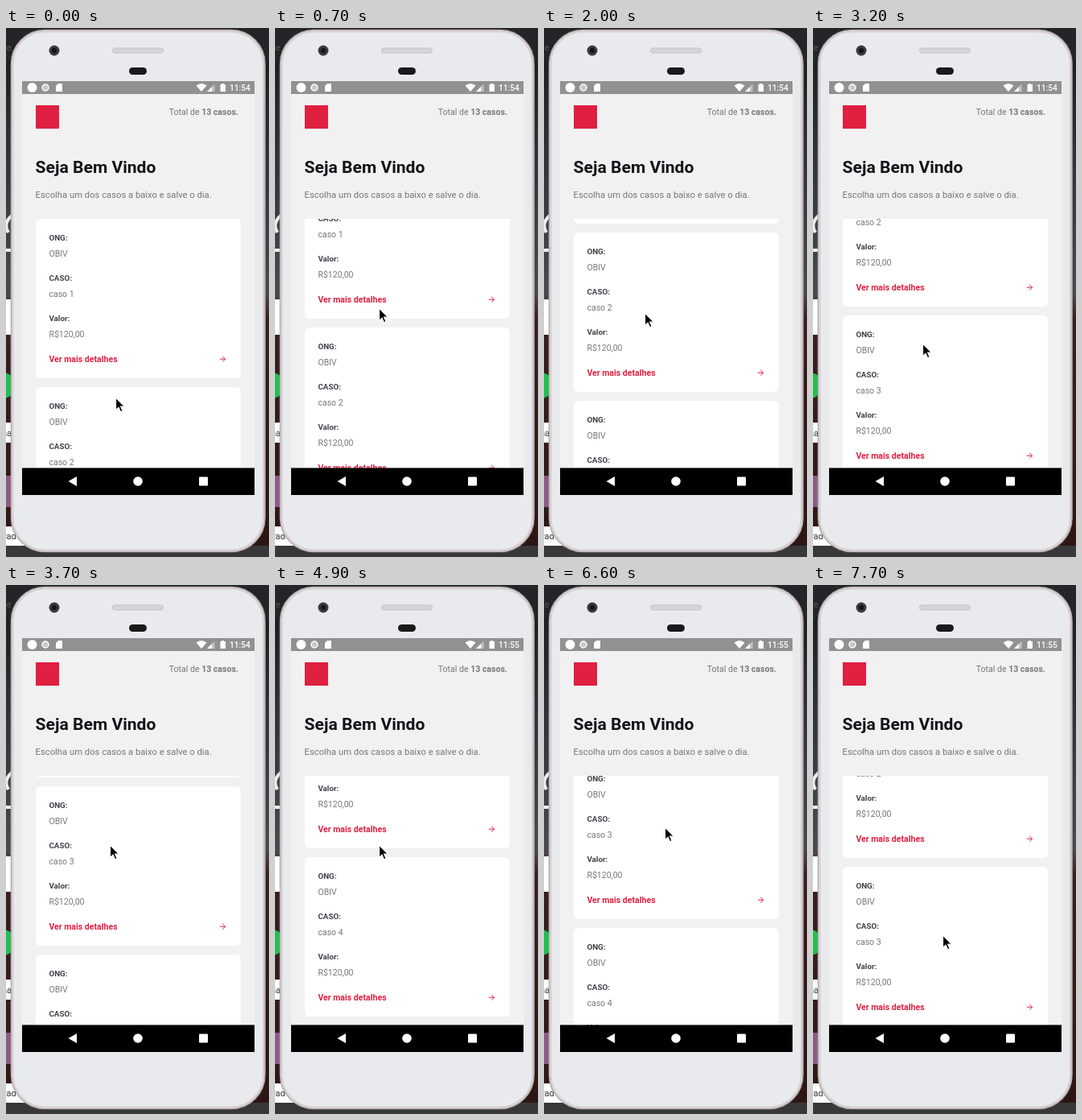
Recreate the animation shown at these times as an HTML page. Size 327 by 657 pixels, loop 8000 ms.

```html
<!DOCTYPE html>
<html lang="pt">
<head>
<meta charset="utf-8">
<style>
  html, body { margin: 0; height: 100%; overflow: hidden; background: #222; }
  svg { display: block; }
  text { font-family: Roboto, sans-serif; white-space: pre; }
  .label { font-size: 9.84px; font-weight: 700; fill: #41414a; }
  .value { font-size: 10.55px; fill: #77777c; }
  .link { font-size: 10.55px; font-weight: 700; fill: #e02041; }
</style>
</head>
<body>
<svg width="327" height="657" viewBox="0 0 327 657">
  <defs>
    <linearGradient id="sky" x2="0" y2="1">
      <stop offset="0" stop-color="#17181b"/>
      <stop offset=".25" stop-color="#30343a"/>
      <stop offset=".5" stop-color="#4a4a4e"/>
      <stop offset=".55" stop-color="#3a2020"/>
      <stop offset="1" stop-color="#2c1614"/>
    </linearGradient>
    <clipPath id="window"><rect x="20" y="237" width="289" height="310"/></clipPath>
  </defs>

  <!-- page behind the phone -->
  <rect width="327" height="657" fill="url(#sky)"/>
  <rect width="327" height="42" fill="#242528"/>
  <text x="-6" y="28" font-size="11" fill="#555">Re</text>
  <path d="M7 233Q-4 243 3 254M0 276H7" fill="none" stroke="#eee" stroke-width="4"/>
  <path d="M0 337H12V381H0zM0 490H12V515H0zM0 619H24V643H0z" fill="#fff"/>
  <circle cx="-4" cy="444" r="16" fill="#1fbf4f"/>
  <rect y="556" width="12" height="39" fill="#8d5a86"/>
  <g font-size="11" fill="#333">
    <text x="-5" y="507">na</text>
    <text x="-3" y="635">rad</text>
  </g>
  <rect y="643" width="327" height="14" fill="#38383b"/>

  <!-- phone body -->
  <rect x="6.5" y="2.5" width="315.5" height="648" rx="42" fill="#e9eaed" stroke="#b3a8ab" stroke-width="1.6"/>
  <rect x="8.5" y="4.5" width="311.5" height="644" rx="40" fill="none" stroke="#d8d0d2" stroke-width="2"/>
  <circle cx="60" cy="28" r="6.5" fill="#3b3b3f"/>
  <circle cx="60" cy="28" r="3.2" fill="#17171b"/>
  <rect x="132.5" y="25" width="63" height="6" rx="3" fill="#d6d5d7" stroke="#c3c1c3"/>
  <rect x="153" y="49" width="22" height="9" rx="4.5" fill="#1a1a1c"/>

  <!-- screen -->
  <rect x="20" y="66" width="289" height="514" fill="#f1f1f1"/>
  <rect x="20" y="66" width="289" height="16" fill="#919191"/>
  <g fill="#fff">
    <circle cx="32.5" cy="74" r="6"/>
    <circle cx="49" cy="74" r="4" fill="#c9c9c9" stroke="#fff" stroke-width="1.5"/>
    <path d="M65 69H70V79H62V72z"/>
    <path d="M236.5 71.5Q243 66.5 249.5 71.5L243 79z"/>
    <path d="M250 79L259.5 69.5V79z" opacity=".45"/>
    <path d="M250 79L256 73V79z"/>
    <path d="M268 69H271V70H273V79H266.5V70H268z"/>
    <text id="clock" x="278" y="78" font-size="10.2" font-weight="500"></text>
  </g>
  <rect x="37" y="96" width="29" height="29" fill="#e02041"/>
  <text x="202.8" y="108" class="value">Total de <tspan font-weight="700">13 casos.</tspan></text>
  <text x="36.6" y="180.4" font-size="21.1" font-weight="700" fill="#13131a">Seja Bem Vindo</text>
  <text x="36.6" y="210.7" font-size="11.25" fill="#77777c">Escolha um dos casos a baixo e salve o dia.</text>
  <g clip-path="url(#window)"><g id="list"></g></g>

  <rect x="20" y="546.4" width="289" height="33.6"/>
  <g fill="#fff">
    <path d="M77.5 563L88 557V569z"/>
    <circle cx="164" cy="563" r="5.8"/>
    <rect x="240" y="557.5" width="11" height="11" rx="1"/>
  </g>

  <path id="pointer" d="M0 0V15.5L3.6 12.2L6 17.8L8.6 16.7L6.2 11.2H11z" stroke="#fff" stroke-width="1.2"/>
</svg>
<script>
const DURATION = 8000, STEP = 100, PITCH = 209;
const el = id => document.getElementById(id);
const moveTo = (id, x, y) => el(id).setAttribute('transform', `translate(${x} ${y})`);

const field = (y, label, value) =>
  `<text x="53.4" y="${y}" class="label">${label}:</text>
   <text x="53.4" y="${y + 19.7}" class="value">${value}</text>`;

const card = i => `<g transform="translate(0 ${237 + i * PITCH})">
  <rect x="36.9" width="255" height="198" rx="5.6" fill="#fff"/>
  ${['ONG OBIV', `CASO caso ${i + 1}`, 'Valor R$120,00'].map((line, row) => {
    const [label, ...value] = line.split(' ');
    return field(27.2 + row * 50, label, value.join(' '));
  }).join('')}
  <text x="53.4" y="178" class="link">Ver mais detalhes</text>
  <path d="M265.8 174.2h6.8m-3.4 -3.4l3.4 3.4l-3.4 3.4" fill="none" stroke="#e02041"/>
</g>`;

el('list').innerHTML = Array.from({ length: 5 }, (_, i) => card(i)).join('');

// Each move eases from the previous place as progress ** power.
const move = (start, end, power, ...goal) => ({ start, end, power, goal });

const scrolling = [
  move(0, 900, 1, 95),
  move(1100, 2300, 1, 224),
  move(3100, 3700, 0.5, 405),
  move(4000, 4900, 3, 526),
  move(5800, 6700, 7.8, 305),
];
const pointing = [
  move(0, 700, 1, 129.5, 348),
  move(1100, 1500, 1, 137, 450),
  move(1500, 2000, 1, 125.5, 354),
  move(2000, 2300, 1, 136.5, 392),
  move(3200, 3700, 1, 129.5, 323),
  move(5400, 5700, 1, 146, 441),
  move(6100, 6600, 1, 150.5, 301),
  move(6800, 7700, 1, 161.5, 435),
];

function follow(moves, t, ...place) {
  for (const { start, end, power, goal } of moves) {
    if (t <= start) break;
    const k = Math.min(1, (t - start) / (end - start)) ** power;
    place = place.map((v, i) => v + (goal[i] - v) * k);
  }
  return place;
}

function tick() {
  const t = Math.floor(performance.now() % DURATION / STEP) * STEP;
  const [scroll] = follow(scrolling, t, 0);
  moveTo('list', 0, -Math.round(scroll));
  moveTo('pointer', ...follow(pointing, t, 136.5, 459));
  el('clock').textContent = t < 4200 ? '11:54' : '11:55';
  requestAnimationFrame(tick);
}
tick();
</script>
</body>
</html>
```
